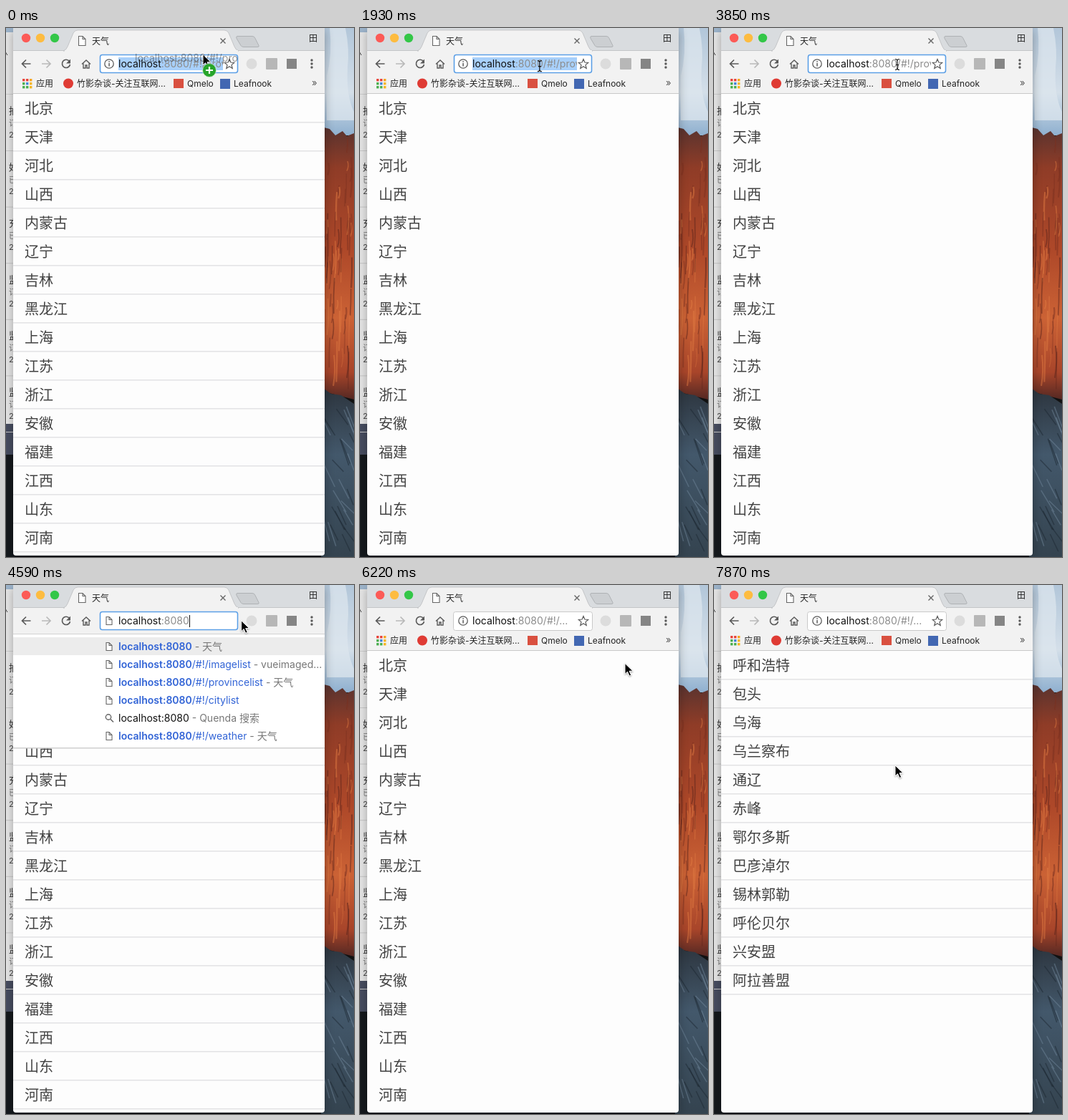
Recreate the animation shown at these times as an HTML page. Size 486 by 739 pixels, loop 8000 ms.

```html
<!DOCTYPE html>
<html lang="zh-CN">
<head>
<meta charset="utf-8">
<title>天气</title>
<style>
  html, body { margin: 0; width: 100%; height: 100%; overflow: hidden; background: #111; }
  svg { display: block; }
  text { font-family: Inter, "Noto Sans CJK SC", "Noto Sans CJK", sans-serif; white-space: pre; }
  .icon { fill: none; stroke: #5a5a5a; stroke-width: 1.7; }
  .doc { fill: #fff; stroke: #666; stroke-width: 1.1; }
</style>
</head>
<body>
<svg id="stage" width="486" height="739" viewBox="0 0 486 739"></svg>
<script>
const STEP = 148.3, LOOP = 8000, LAST = 53;
const provinces = '北京 天津 河北 山西 内蒙古 辽宁 吉林 黑龙江 上海 江苏 浙江 安徽 福建 江西 山东 河南'.split(' ');
const cities = '呼和浩特 包头 乌海 乌兰察布 通辽 赤峰 鄂尔多斯 巴彦淖尔 锡林郭勒 呼伦贝尔 兴安盟 阿拉善盟'.split(' ');

const text = (x, y, s, size = 12, fill = '#222', extra = '') =>
  `<text x="${x}" y="${y}" font-size="${size}" fill="${fill}" ${extra}>${s}</text>`;
const rect = (x, y, w, h, fill, extra = '') =>
  `<rect x="${x}" y="${y}" width="${w}" height="${h}" fill="${fill}" ${extra}/>`;
const circle = (x, y, r, fill, extra = '') =>
  `<circle cx="${x}" cy="${y}" r="${r}" fill="${fill}" ${extra}/>`;
const path = (d, attrs) => `<path d="${d}" ${attrs}/>`;
const group = (id, body) => `<g id="${id}">${body}</g>`;
const span = (s, fill, weight = 400) => `<tspan fill="${fill}" font-weight="${weight}">${s}</tspan>`;
const doc = (x, y, w, h) =>
  path(`M${x} ${y}h${w - 4}l4 4v${h - 4}h${-w}zM${x + w - 4} ${y}v4h4`, 'class="doc"');
const gradient = (id, stops) =>
  `<linearGradient id="${id}" x2="0" y2="1">${stops.map(([at, c]) =>
    `<stop offset="${at}" stop-color="${c}"/>`).join('')}</linearGradient>`;

let seed = 11;
const random = () => (seed = seed * 16807 % 2147483647) / 2147483647;

function wallpaper() {
  let out = rect(440, 0, 46, 150, 'url(#sky)') +
    path('M452 0h22q6 30 3 55q-2 40 9 62v12h-38v-62q8-30 4-67z', 'fill="#dde6ee" opacity=".75"') +
    path('M440 138l12 3 8 9 10-6 6 7 10-4v372l-46-12z', 'fill="url(#rock)"');
  for (let i = 0; i < 60; i++) {
    const x = 445 + random() * 40, y = 150 + random() * 310, len = 12 + random() * 45;
    const color = ['#5a241c', '#e07a42', '#7a2f1f'][i % 3];
    out += path(`M${x} ${y}q${random() * 5 - 2} ${len / 2} -1 ${len}`,
      `fill="none" stroke="${color}" stroke-width="${0.8 + random() * 1.6}" opacity=".5"`);
  }
  out += path('M440 501l14 10 14 2 18 12v214h-46z', 'fill="url(#slate)"');
  for (let i = 0; i < 26; i++) {
    const x = 440 + random() * 40, y = 520 + random() * 190;
    out += path(`M${x} ${y}l${8 + random() * 12} ${16 + random() * 22}`,
      `stroke="${i % 2 ? '#70869a' : '#1c2731'}" stroke-width="1.5" opacity=".5"`);
  }
  return out;
}

function backWindow() {
  let out = rect(0, 0, 14, 6, '#9db4cb') + rect(0, 6, 14, 548, '#e6e6e6') +
    rect(0, 92, 14, 1, '#ccc') + path('M-1 33l3 5', 'stroke="#444"') +
    rect(0, 553, 14, 43, '#474d60') + rect(0, 596, 14, 143, '#15191d');
  [...'抽好充监监监'].forEach((c, i) => {
    const y = 120 + i * 78.6;
    out += text(4, y, c, 13, '#333') + text(4, y + 17, '订已已订订订'[i], 11, '#777') +
      text(4, y + 33, '2', 11, '#444') + rect(0, y + 51, 14, 1, '#c8c8c8');
  });
  return out;
}

const list = names => names.map((s, i) => text(26, 119.5 + i * 40, s, 20, '#424242')).join('');
const rules = n => Array.from({ length: n }, (_, i) => rect(10, 131 + i * 40, 435, 1.6, '#e4e4e6')).join('');

function tabStrip() {
  const lights = ['#fc5b57', '#fdbc40', '#33c748'].map((c, i) => circle(28 + i * 20, 14, 6.2, c)).join('');
  return rect(10, 0, 435, 32, '#d9dcdf') + rect(10, 31, 435, 61, '#f2f2f2') +
    rect(10, 31, 435, 1, '#c3c5c7') + rect(10, 91, 435, 1, '#c9c9c9') +
    path('M80 32q4-1 6-6l8-19q2-4 6-4h205q4 0 6 4l8 19q2 5 6 6z', 'fill="#f2f2f2" stroke="#bbbdbf" stroke-width=".8"') +
    rect(82, 31, 242, 2, '#f2f2f2') + lights + doc(101.5, 11.5, 9.5, 13) +
    text(120, 22.5, '天气') + path('M299.5 14.5l7 7m0-7l-7 7', 'stroke="#666" stroke-width="1.4"') +
    path('M323 11.5h21q3 0 4 3l5 10q1 2-2 2h-19q-3 0-4-2l-6-10q-1-3 1-3z', 'fill="#cccfd2" stroke="#afb2b5"') +
    text(423, 18.5, '田');
}

function toolbar() {
  return path('M34.5 50H22.5m5.5-5.5l-5.5 5.5 5.5 5.5', 'class="icon"') +
    path('M50 50h12m-5.500-5.500l5.500 5.500-5.500 5.500', 'class="icon" style="stroke:#b9b9b9"') +
    path('M88.500 46.500a5.600 5.600 0 1 0 1 4.500', 'class="icon"') + path('M90 43.500v6h-6z', 'fill="#5a5a5a"') +
    path('M106 50.500l6-5.500 6 5.500m-10-1v6.500h3v-4h2v4h3v-6.500', 'class="icon" style="stroke-width:1.4"') +
    circle(343, 50, 7.5, '#dcdcdc') + rect(359, 38, 24, 24, '#dcdcdc', 'id="hover"') +
    rect(363, 42, 16, 16, '#b7b7b7', 'rx="1"') + rect(392, 43, 14, 14, '#858585') +
    [45, 50, 55].map(y => circle(427, y, 1.7, '#5a5a5a')).join('');
}

function bookmarks() {
  const colors = ['#e8453c', '#e8453c', '#f5a623', '#4caf50', '#4285d8', '#f5b623', '#4caf50', '#4caf50', '#f5b623'];
  return colors.map((c, i) => rect(23 + i % 3 * 5, 71 + (i / 3 | 0) * 5, 3.4, 3.4, c)).join('') +
    text(42, 82, '应用') + circle(87, 77.5, 7, '#df3b34') + text(99, 82, '竹影杂谈-关注互联网...') +
    rect(234, 71, 14, 13, '#d95040') + text(253, 82, 'Qmelo') +
    rect(299, 71, 14, 14, '#4267b2') + text(318, 82, 'Leafnook') + text(427, 81, '»', 13, '#555');
}

const address = (x, rest) => text(x, 55, span('localhost', '#111') + span(rest, '#8c8c8c'), 14);

function omnibox() {
  return rect(130.5, 37.5, 194, 26, '#fff', 'rx="3" stroke="#c9c9c9" id="idleBox"') +
    rect(131.5, 37.5, 192, 25, '#fff', 'rx="3" stroke="#5b9fe6" stroke-width="1.6" id="focusBox"') +
    rect(157, 41, 146, 18, '#a8d0fb', 'id="selection"') +
    group('urlShort', address(157, ':8080/#!/...')) +
    group('urlLong', `<g clip-path="url(#urlClip)">${address(157, ':8080/#!/provincelist')}</g>`) +
    group('urlTyped', address(157, ':8080') + doc(140, 44.5, 8, 11)) +
    rect(256, 42, 1, 17, '#111', 'id="caret"') +
    group('pageInfo', circle(144, 50, 6.2, 'none', 'stroke="#5a5a5a" stroke-width="1.3"') +
      rect(143.3, 49, 1.5, 4.5, '#5a5a5a') + rect(143.3, 46.2, 1.5, 1.6, '#5a5a5a') +
      path('M312 43.500l1.900 4.500 4.800.4-3.700 3.200 1.200 4.800-4.200-2.600-4.200 2.600 1.200-4.800-3.700-3.200 4.800-.4z',
        'class="icon" style="stroke-width:1.2"'));
}

function popup() {
  const blue = '#3264d6', gray = '#777';
  const rows = [['', ' - 天气'], ['/#!/imagelist', ' - vueimaged...'], ['/#!/provincelist', ' - 天气'],
    ['/#!/citylist', ''], null, ['/#!/weather', ' - 天气']];
  let out = rect(10, 68, 435, 160, '#fff') + rect(10, 68, 435, 1, '#d2d2d2') +
    rect(10, 73, 435, 25, '#ececec') + rect(10, 227, 435, 1.5, '#d0d0d0');
  rows.forEach((row, i) => {
    const y = 86 + i * 25;
    out += row
      ? doc(140, y - 5.5, 8, 11) + text(157, y + 5,
          span('localhost:8080', blue, 600) + span(row[0], blue) + span(row[1], gray), 14)
      : circle(143, y - 1.5, 3.7, 'none', 'stroke="#666" stroke-width="1.4"') +
        path(`M146 ${y + 1.5}l4 4`, 'stroke="#666" stroke-width="1.6"') +
        text(157, y + 5, span('localhost:8080', '#111') + span(' - Quenda 搜索', gray), 14);
  });
  return out;
}

const pointer = group('arrow', path('M0 0v15l3.500-3.300 2.600 5.800 2.600-1.100-2.600-5.700h5z',
    'fill="#000" stroke="#fff" stroke-width="1" filter="url(#soft)"')) +
  group('beam', path('M-3-7.500q3 0 3 2.500v10q0 2.500-3 2.500m6-15q-3 0-3 2.500m0 10q0 2.500 3 2.500m-5-7h4',
    'fill="none" stroke="#111" stroke-width="1.200"')) +
  group('drag', `<g opacity=".5">${text(-95, 10, 'localhost:8080/#!/pro', 14, '#333')}</g>` +
    circle(9, 22, 9.5, '#27a52b', 'stroke="#d8ecd8" stroke-width=".8"') +
    path('M4 22h10m-5-5v10', 'stroke="#fff" stroke-width="2.200"'));

stage.innerHTML = `<defs>
  ${gradient('sky', [[0, '#b2c6d9'], [.6, '#d4dfe9'], [1, '#8fb0cf']])}
  ${gradient('rock', [[0, '#58332f'], [.15, '#8f3c27'], [.45, '#ae4829'], [.7, '#cb6235'], [.9, '#a8452a'], [1, '#542823']])}
  ${gradient('slate', [[0, '#2c343d'], [.4, '#43586b'], [1, '#34434f']])}
  <clipPath id="urlClip"><rect x="157" y="38" width="146" height="25"/></clipPath>
  <clipPath id="windowClip"><path d="M10 0h435v733q0 4-4 4H14q-4 0-4-4z"/></clipPath>
  <filter id="blur" x="-20%" width="140%"><feGaussianBlur stdDeviation="7"/></filter>
  <filter id="soft" x="-50%" y="-50%" width="200%" height="200%">
    <feDropShadow dx="0" dy="1" stdDeviation="1" flood-opacity=".4"/></filter></defs>` +
  rect(0, 730, 486, 9, '#171b20') + wallpaper() + backWindow() +
  rect(10, 4, 435, 735, '#000', 'opacity=".3" filter="url(#blur)"') +
  `<g clip-path="url(#windowClip)">` + rect(10, 0, 435, 737, '#fdfdfd') +
  group('provinceRules', rules(16)) + group('provinceList', list(provinces)) +
  group('cityList', rules(12) + list(cities)) +
  tabStrip() + bookmarks() + group('suggestions', popup()) + toolbar() + omnibox() + '</g>' +
  group('cursor', pointer);

// Pointer path: step, x, y
const track = [[0, 275, 37], [2, 258, 9], [4, 240, 48], [5, 237, 51], [8, 237, 51], [9, 270, 62],
  [10, 200, 58], [12, 250, 53], [19, 256, 54], [22, 256, 51], [28, 256, 51], [33, 377, 49],
  [39, 377, 49], [45, 363, 170], [51, 253, 252], [LAST, 253, 252]];

function pointerAt(step) {
  const i = Math.max(1, track.findIndex(k => k[0] >= step));
  const [s0, x0, y0] = track[i - 1], [s1, x1, y1] = track[i];
  const f = (step - s0) / (s1 - s0);
  return [x0 + (x1 - x0) * f, y0 + (y1 - y0) * f];
}

const show = (id, on) => document.getElementById(id).style.display = on ? '' : 'none';

function render(step) {
  const [x, y] = pointerAt(step);
  const dragging = step <= 2;
  const editing = step >= 27 && step < 37;
  const focused = dragging || (step >= 12 && step < 37);
  const overText = !dragging && x > 131 && x < 305 && y > 36 && y < 65;
  cursor.setAttribute('transform', `translate(${x} ${y})`);
  show('arrow', !overText);
  show('beam', overText);
  show('drag', dragging);
  show('idleBox', !focused);
  show('focusBox', focused);
  show('selection', dragging || (step >= 12 && step < 22));
  show('urlShort', !focused);
  show('urlLong', focused && !editing);
  show('urlTyped', editing);
  show('caret', editing && step % 7 < 4);
  show('pageInfo', !editing);
  show('suggestions', editing);
  show('hover', x > 359 && y < 62);
  show('provinceList', step < LAST);
  show('provinceRules', step === 0 || (step >= 27 && step < 39));
  show('cityList', step >= LAST);
}

function tick() {
  render(Math.min(LAST, Math.floor((performance.now() % LOOP + 15) / STEP)));
  requestAnimationFrame(tick);
}
tick();
</script>
</body>
</html>
```
